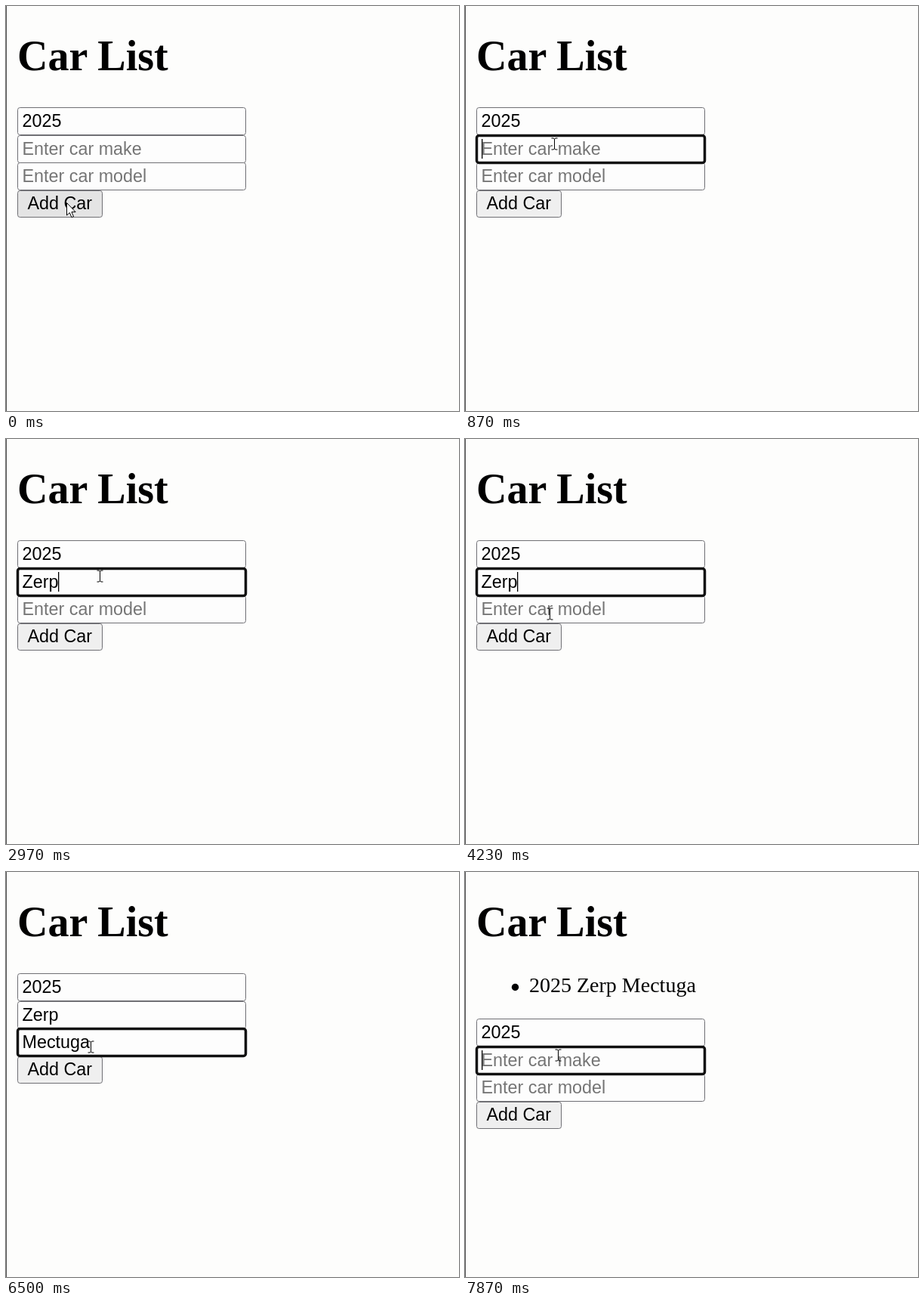
An HTML page for the animation above (8 s loop, 600 by 536 pixels).

```html
<!DOCTYPE html>
<html lang="en">
<head>
<meta charset="utf-8">
<title>Car List</title>
<style>
  html, body { margin: 0; width: 100%; height: 100%; overflow: hidden; background: #fdfdfc; }
  svg { display: block; width: 600px; height: 536px; }
  text { white-space: pre; }
  .sans { font: 23.333px "Liberation Sans", Arial, sans-serif; }
  .serif { font: 28px "Liberation Serif", "Times New Roman", serif; }
  .title { font: bold 56px "Liberation Serif", "Times New Roman", serif; }
  .box { fill: #fdfdfd; stroke: #6f6f74; }
  .ring { fill: none; stroke: #101010; stroke-width: 3.5; }
</style>
</head>
<body>
<svg viewBox="0 0 600 536">
  <rect width="600" height="536" fill="#fdfdfc"/>
  <rect width="1" height="536" fill="#505050"/>
  <text class="title" x="15" y="85">Car List</text>
  <g id="item">
    <circle cx="66.5" cy="152.5" r="4.7"/>
    <text class="serif" x="85" y="159">2025 Zerp Mectuga</text>
  </g>
  <g id="form">
    <g id="fields"></g>
    <rect id="button" class="box" x="15.5" y="244.5" width="112" height="35" rx="3"/>
    <text class="sans" x="28.5" y="269">Add Car</text>
    <rect id="ring" class="ring" x="15.5" width="302" height="36" rx="3"/>
    <rect id="caret" width="1.3" height="26"/>
  </g>
  <path id="arrow" d="M0 0V16.5L3.8 13 6.4 19.2 9 18.1 6.4 12.1H11.6Z" fill="#fff" stroke="#000"/>
  <path id="beam" d="M-3.5 -7.5H-1L.5 -6.5 2 -7.5H4.5M.5 -6.5V6.5M-3.5 7.5H-1L.5 6.5 2 7.5H4.5" fill="none" stroke="#000"/>
</svg>
<script>
const LOOP = 8000, SHIFT = 60, TEXT_X = 21.5;
const SUBMIT = 7450, BLINK = 500;
const FIELD_TOP = 134, FIELD_STEP = 36.5;
const $ = id => document.getElementById(id);

// "start" and "pace" time the typing, "focus" lists spans with the keyboard focus.
const fields = [
  { value: "2025", focus: [] },
  { word: "Zerp", hint: "Enter car make", start: 2670, pace: 86, focus: [[780, 4340], [7830, LOOP]] },
  { word: "Mectuga", hint: "Enter car model", start: 4700, pace: 215, focus: [[4340, 7420]] }
];

// Pointer moves: each glides to its place between two times.
const home = { x: 80, y: 260 };
const moves = [
  { from: 400, to: 700, x: 118, y: 182 },
  { from: 870, to: 2000, x: 124, y: 181, circling: true },
  { from: 3780, to: 4225, x: 112, y: 231 },
  { from: 7330, to: 7400, x: 104, y: 262 },
  { from: 7690, to: 7800, x: 123, y: 242 }
];

function add(parent, name, attrs) {
  const el = document.createElementNS("http://www.w3.org/2000/svg", name);
  for (const key in attrs) el.setAttribute(key, attrs[key]);
  return parent.appendChild(el);
}

fields.forEach((f, i) => {
  f.y = Math.floor(FIELD_TOP + i * FIELD_STEP + .5);
  add($("fields"), "rect", { class: "box", x: 15.5, y: f.y + .5, width: 302, height: 36, rx: 3 });
  f.text = add($("fields"), "text", { class: "sans", x: TEXT_X, y: f.y + 25.7 });
});

function typed(f, t) {
  if (!f.word) return f.value;
  if (t < f.start || t >= SUBMIT) return "";
  return f.word.slice(0, Math.floor((t - f.start) / f.pace) + 1);
}

// The caret rests once after the last key.
function caretOn(f, t) {
  const idle = t - f.start - f.pace * (f.word.length - 1);
  return idle < BLINK || idle >= 2 * BLINK;
}

function pointerAt(t) {
  let { x, y } = home;
  for (const m of moves) {
    const u = Math.min(1, Math.max(0, (t - m.from) / (m.to - m.from)));
    const k = u * u * (3 - 2 * u);
    x += (m.x - x) * k;
    y += (m.y - y) * k;
    if (m.circling) {
      x -= 55 * Math.sin(2 * Math.PI * k);
      y -= 60 * Math.sin(4 * Math.PI * k);
    }
  }
  return [Math.round(x), Math.round(y)];
}

const show = (id, on) => $(id).setAttribute("visibility", on ? "visible" : "hidden");
const place = (id, x, y) => $(id).setAttribute("transform", `translate(${x} ${y})`);

function draw(t) {
  const dy = t >= SUBMIT ? SHIFT : 0;
  show("item", dy > 0);
  place("form", 0, dy);

  for (const f of fields) {
    f.value = typed(f, t);
    f.text.textContent = f.value || f.hint;
    f.text.setAttribute("fill", f.value ? "#000" : "#757575");
  }

  const active = fields.find(f => f.focus.some(([from, to]) => t >= from && t < to));
  show("ring", active);
  show("caret", active && caretOn(active, t));
  if (active) {
    const width = active.value ? active.text.getComputedTextLength() : 0;
    $("ring").setAttribute("y", active.y + .5);
    $("caret").setAttribute("x", Math.round(TEXT_X + width));
    $("caret").setAttribute("y", active.y + 5);
  }

  const [x, y] = pointerAt(t);
  const inside = (l, top, r, b) => x >= l && x <= r && y >= top && y <= b;
  const hover = inside(15, 244 + dy, 128, 280 + dy);
  const overText = inside(15, 134 + dy, 318, 243 + dy) || inside(14, 40, 214, 96);
  $("button").style.fill = hover ? "#e4e4e4" : "#efefef";
  show("beam", overText);
  show("arrow", !overText);
  place("beam", x, y + .5);
  place("arrow", x + .5, y + .5);
}

function tick() {
  draw(performance.now() % LOOP);
  requestAnimationFrame(tick);
}
tick();
</script>
</body>
</html>
```
